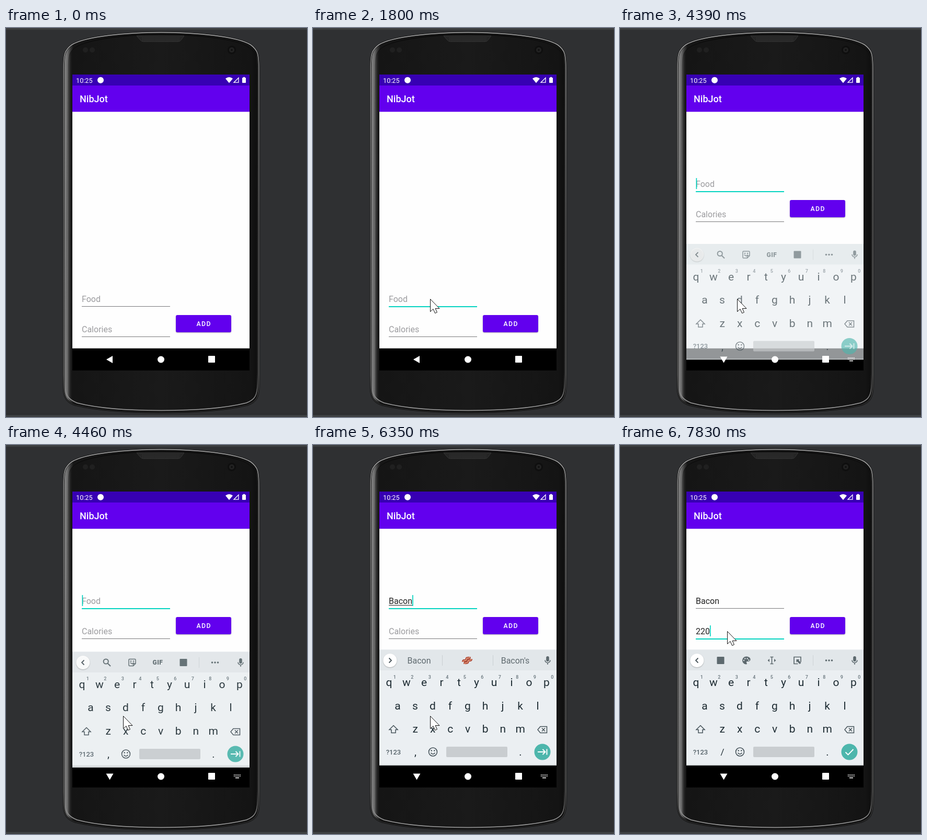
An HTML page with a canvas for the animation above (8 s loop, 576 by 744 pixels).

```html
<!DOCTYPE html>
<html lang="en">
<head>
<meta charset="utf-8">
<style>
html, body { margin: 0; width: 100%; height: 100%; overflow: hidden; background: #2f3032; }
canvas { display: block; }
</style>
</head>
<body>
<canvas id="stage" width="576" height="744"></canvas>
<script>
const g = document.getElementById('stage').getContext('2d');
const LOOP = 8000, TEAL = '#03d3c0', PURPLE = '#6200ee', INK = '#1d2b32', ICON = '#5d696e';

const clamp = v => Math.max(0, Math.min(1, v));
const mix = (a, b, k) => a + (b - a) * k;
const within = (t, spans) => spans.some(([a, b]) => t >= a && t < b);
// Progress from a to b held in n equal steps.
const stepped = (t, a, b, n) => clamp(Math.floor((t - a) / (b - a) * n + 1e-6) / n);

function rect(x, y, w, h, color, r = 0) {
  g.fillStyle = color;
  g.beginPath();
  g.roundRect(x, y, w, h, r);
  g.fill();
}
function dot(x, y, r, color) {
  g.fillStyle = color;
  g.beginPath();
  g.arc(x, y, r, 0, Math.PI * 2);
  g.fill();
}
function shape(d, x, y, fill, stroke, width = 1.6) {
  const p = new Path2D(d);
  g.save();
  g.translate(x, y);
  if (fill) { g.fillStyle = fill; g.fill(p, 'evenodd'); }
  if (stroke) { g.strokeStyle = stroke; g.lineWidth = width; g.stroke(p); }
  g.restore();
}
function label(s, x, y, size, color, align = 'left', weight = 400, spacing = 0) {
  g.font = `${weight} ${size}px Roboto, sans-serif`;
  g.letterSpacing = spacing + 'px';
  g.textAlign = align;
  g.fillStyle = color;
  g.fillText(s, x, y);
  g.letterSpacing = '0px';
}
function gradient(x0, y0, x1, y1, stops) {
  const q = g.createLinearGradient(x0, y0, x1, y1);
  stops.forEach(([k, c]) => q.addColorStop(k, c));
  return q;
}

const BODY = 'M110 82C110 50 112 42 126 32C152 16 230 8.5 297 8.5C364 8.5 442 16 468 32C482 42 484 50 484 82V682C484 706 479 715 462 721C420 731 360 735 297 735C234 735 174 731 132 721C115 715 110 706 110 682Z';
const FACE = 'M119 80C119 52 121 45 133 37C158 21 230 12.5 297 12.5C364 12.5 440 21 463 36C478 46 481 52 481 82V680C481 703 476 711 460 717C420 727 360 731.5 297 731.5C234 731.5 174 727 136 717C121 711 113 704 113 680Z';

function phone() {
  rect(0, 0, 576, 744, '#2f3032');
  rect(0, 0, 576, 3.5, '#3d3f41');
  rect(0, 738, 576, 1, '#29292b');
  rect(0, 740, 576, 4, '#3d3f41');
  shape(BODY, 0, 0, gradient(110, 0, 484, 0, [
    [0, '#3a3a3a'], [.008, '#808080'], [.02, '#6c6c6c'], [.034, '#3c3c3c'],
    [.05, '#161616'], [.95, '#151515'], [.985, '#101010'], [1, '#444']
  ]), '#0b0b0b', 3);
  shape(BODY, 0, 0, null, gradient(0, 8, 0, 735, [
    [0, '#b4b4b4'], [.08, '#8b8b8b'], [.5, '#656565'], [.9, '#606060'], [.96, '#333'], [1, '#222']
  ]), 1.6);
  shape(FACE, 0, 0, gradient(110, 0, 484, 0, [
    [0, 'rgba(20,20,20,0)'], [.02, 'rgba(20,20,20,0)'], [.045, '#151515'],
    [.5, '#1a1a1a'], [.96, '#141414'], [1, '#0d0d0d']
  ]), gradient(0, 12, 0, 731, [
    [0, '#080808'], [.06, 'rgba(8,8,8,.2)'], [.9, 'rgba(80,80,80,.2)'], [.97, '#9a9a9a'], [1, '#a0a0a0']
  ]), 1.4);
  shape('M250 15H341L335 23Q333 26 329 26H263Q259 26 257 23Z', 0, 0, '#252525', '#353535', 1);
  for (let y = 18; y < 25; y += 3)
    for (let x = 261; x < 332; x += 3) rect(x, y, 1.4, 1.4, '#353535');
  dot(152, 42, 5, '#202020');
  dot(165, 42, 5, '#202020');
  dot(432, 42, 8, '#0f0f0f');
  dot(432, 42, 5, '#222');
  dot(432, 42, 2, '#111');
}

function screen() {
  rect(127, 89, 339, 566, '#fefefe');
  rect(127, 89, 339, 21, '#3700b3');
  rect(127, 110, 339, 50.3, PURPLE);
  rect(127, 612.8, 339, 42.2, '#000');
  label('10:25', 134, 104.5, 12.7, '#fff');
  dot(181, 99.7, 6, '#fff');
  shape('M0 5.5L-7 -3Q0 -8.5 7 -3Z', 427, 99.7, '#fff');
  shape('M-4.5 4.5H4.5V-4.5Z', 440.5, 99.7, null, '#fff', 1.3);
  rect(452, 95, 7, 10, '#fff', 1);
  rect(454, 93.8, 3, 2, '#fff');
  label('NibJot', 141, 142, 18, '#fff', 'left', 500);
}

function field(hint, text, y, focus, caret, composing) {
  label(text || hint, 145, y, 16, text ? '#222' : '#9c9c9f');
  const end = 145 + (text ? g.measureText(text).width : 0);
  if (composing) rect(145, y + 2, end - 145, 1, '#222');
  rect(145, y + 8, 169, 1, '#77777a');
  if (focus) {
    g.globalAlpha = focus;
    rect(145, y + 8, 169, 2, TEAL);
    g.globalAlpha = 1;
  }
  if (caret) rect(Math.max(145.5, end), y - 17, 1.7, 21, TEAL);
}

function form(t) {
  const y = t < 3530 ? 524 : 304;
  const blink = within(t, [[1270, 1800], [2240, 2780], [3260, 3730], [4260, 4740],
    [5260, 5940], [6210, 6810], [7290, LOOP]]);
  const second = t >= 7220;
  const typed = (s, times) => s.slice(0, times.filter(at => t >= at).length);
  const food = typed('Bacon', [5260, 5330, 5470, 6210, 6280]);
  const cal = typed('220', [7630, 7700, 7830]);
  field('Food', food, y, second ? 0 : stepped(t, 1040, 1400, 4), blink && !second, food && !second);
  field('Calories', cal, y + 58, second ? stepped(t, 7220, 7360, 2) : 0, blink && second);

  g.save();
  g.shadowColor = 'rgba(0,0,0,.3)';
  g.shadowBlur = 2;
  g.shadowOffsetY = 1;
  rect(325, y + 25, 106, 33, PURPLE, 3);
  g.restore();
  label('ADD', 378.7, y + 46.3, 12.3, '#fff', 'center', 500, 1.4);
}

function navBar(t) {
  const turn = stepped(t, 2240, 2450, 3);
  g.save();
  g.translate(198.5, 634);
  g.rotate(-turn * Math.PI / 2);
  shape('M-6.5 0L5.5 -7V7Z', 0, 0, '#fff');
  g.restore();
  dot(296.5, 634, 6.5, '#fff');
  rect(387, 627, 13, 13, '#fff', 1);
  if (!turn) return;
  g.globalAlpha = turn;
  for (let row = 0; row < 2; row++)
    for (let i = 0; i < 5; i++) rect(436 + i * 2.8, 630 + row * 2.8, 1.5, 1.5, '#fff');
  rect(439, 635.8, 7, 1.6, '#fff');
  g.globalAlpha = 1;
}

const icons = {
  search(x) {
    shape('M3.3 -2A4.6 4.6 0 1 1 -5.9 -2A4.6 4.6 0 1 1 3.3 -2M2 1.5L7.5 7', x, 412, null, ICON, 2);
  },
  sticker(x) {
    shape('M-5 -6.5H5Q6.5 -6.5 6.5 -5V2L2 6.5H-5Q-6.5 6.5 -6.5 5V-5Q-6.5 -6.5 -5 -6.5ZM2 6V2H6M-3.5 0Q0 4.5 3 0', x, 412, null, ICON, 1.5);
    dot(x - 2.5, 409.5, 1.2, ICON);
    dot(x + 2.5, 409.5, 1.2, ICON);
  },
  gif(x) { label('GIF', x, 416, 12, ICON, 'center', 900, .5); },
  square(x) { rect(x - 7, 405, 14, 14, ICON, 1); },
  palette(x) {
    shape('M0 -7.5C10 -7.5 10 2 4 2H2C0 2 0 4 1 5Q2 7.5 0 7.5A7.5 7.5 0 0 1 0 -7.5Z', x, 412, ICON);
    [[-4.5, 0], [-2.2, -3.6], [2.2, -3.6], [4.8, -.5]].forEach(([a, b]) => dot(x + a, 412 + b, 1.2, '#e3e8eb'));
  },
  editing(x) {
    shape('M-3 -6.5H3M0 -6.5V6.5M-3 6.5H3', x, 412, null, ICON, 1.6);
    shape('M-8 0L-4.5 -3V3ZM8 0L4.5 -3V3Z', x, 412, ICON);
  },
  resize(x) {
    shape('M1 6.5H-6.5V-6.5H6.5V3', x, 412, null, ICON, 1.7);
    shape('M-2 -2H4L2.3 -.3L7 4.5L4.5 7L-.3 2.3L-2 4Z', x, 412, ICON);
  }
};

function bacon(x, y) {
  g.save();
  g.translate(x, y);
  g.rotate(-.65);
  [-2.5, 2.5].forEach(dy => {
    const wave = `M-8 ${dy}q2 -2 4 0t4 0t4 0t4 0`;
    shape(wave, 0, 0, null, '#a83d2e', 4.5);
    shape(wave, 0, 0, null, '#edb08b', 1.4);
  });
  g.restore();
}

function strip(t) {
  const tools = t < 5740 || t >= 7700;
  g.save();
  g.shadowColor = 'rgba(0,0,0,.25)';
  g.shadowBlur = 2;
  g.shadowOffsetY = 1;
  dot(147.3, 412, 13, '#fff');
  g.restore();
  shape(tools ? 'M2 -4.5L-2.5 0L2 4.5' : 'M-2 -4.5L2.5 0L-2 4.5', 147.5, 412, null, '#48545a', 1.8);

  if (tools) {
    const set = t < 5740 ? ['search', 'sticker', 'gif', 'square'] : ['square', 'palette', 'editing', 'resize'];
    set.forEach((name, i) => icons[name](192.5 + i * 49));
    rect(369, 402, 1, 20, '#cdd3d6');
    for (let i = -1; i < 2; i++) dot(400 + i * 5.5, 412, 1.8, ICON);
  } else if (t < 7420) {
    const done = t >= 6350;
    const words = done ? ['Bacon', '', "Bacon's"] : ['Bac', 'Back', 'Bach'];
    words.forEach((w, i) => label(w, 203 + i * 92, 418, 16, '#5f6a6f', 'center'));
    if (done) bacon(295, 412);
    rect(247, 402, 1, 20, '#c9cfd2');
    rect(344, 402, 1, 20, '#c9cfd2');
  }
  rect(446.2, 404, 5.6, 10, ICON, 2.8);
  shape('M-5 0A5 5 0 0 0 5 0M0 5V8.5', 449, 411.5, null, ICON, 1.6);
}

function keyboard(t) {
  if (t < 4260) return;
  // The first step is already on its way in.
  const away = (1 - stepped(t, 4194, 4590, 6)) ** 2.43;
  const caps = t >= 5200 && t < 5260;
  const numeric = t >= 7420;
  g.save();
  g.beginPath();
  g.rect(127, 160, 339, 495);
  g.clip();
  g.globalAlpha = 1 - away;
  g.translate(0, 57.6 * away);
  rect(127, 391.5, 339, 221.3, '#ebeff2');
  rect(127, 391.5, 339, 39.5, '#e2e7ea');
  rect(127, 611, 339, 1.8, '#d3d8da');
  strip(t);

  const rows = [['qwertyuiop', 145.5, 461], ['asdfghjkl', 162, 505.5], ['zxcvbnm', 195.7, 550]];
  rows.forEach(([keys, x0, y], row) => [...keys].forEach((c, i) => {
    const x = x0 + i * 33.5;
    label(caps ? c.toUpperCase() : c, x, y + (caps ? 1.5 : 0), 21, INK, 'center');
    if (!row) label((i + 1) % 10, x + 10.7, 446.5, 9, '#66737a', 'center', 500);
  }));

  shape('M0 -7.5L8 .5H4V6.5H-4V.5H-8Z', 154, 544, caps ? '#46535a' : null, '#46535a', 1.5);
  shape('M-9 0L-4 -6H8.5V6H-4ZM-1 -3L5 3M5 -3L-1 3', 439, 544.5, null, '#46535a', 1.5);
  label('?123', 154, 591.7, 13, '#56636a', 'center', 500);
  label(numeric ? '/' : ',', 196, numeric ? 593 : 594, numeric ? 17 : 20, INK, 'center');
  label('.', 397, 594, 20, INK, 'center');
  shape('M8 0A8 8 0 1 1 -8 0A8 8 0 1 1 8 0M-4 1.8Q0 6.6 4 1.8', 229.5, 587, null, '#46535a', 1.6);
  dot(226.7, 584.5, 1.3, '#46535a');
  dot(232.3, 584.5, 1.3, '#46535a');
  rect(255, 577, 117, 20, '#c9cdd0', 2);
  dot(439, 587, 15.5, '#4db6ac');
  shape(numeric ? 'M-7.5 .5L-2.5 5.5L7.5 -5' : 'M-9 0H5M.5 -5L5.5 0L.5 5M8.5 -5.5V5.5', 439, 587, null, '#fff', 1.9);
  g.restore();
}

function pointer(t) {
  if (t < 250) return;
  const a = 1 - (1 - stepped(t, 250, 930, 10)) ** 2;
  const b = stepped(t, 6810, 7150, 5);
  const s = b * b * (3 - 2 * b);
  const x = mix(mix(443, 224, a), 205, s);
  const y = mix(mix(679, 518, a), 356, s);
  shape('M0 0V24L5.5 19L9 27L13 25.3L9.6 18H17.5Z', x + .5, y + .5, '#fff', '#111', 1);
}

const start = performance.now();
function frame() {
  const t = (performance.now() - start) % LOOP;
  phone();
  screen();
  form(t);
  keyboard(t);
  navBar(t);
  pointer(t);
  requestAnimationFrame(frame);
}
frame();
</script>
</body>
</html>
```
